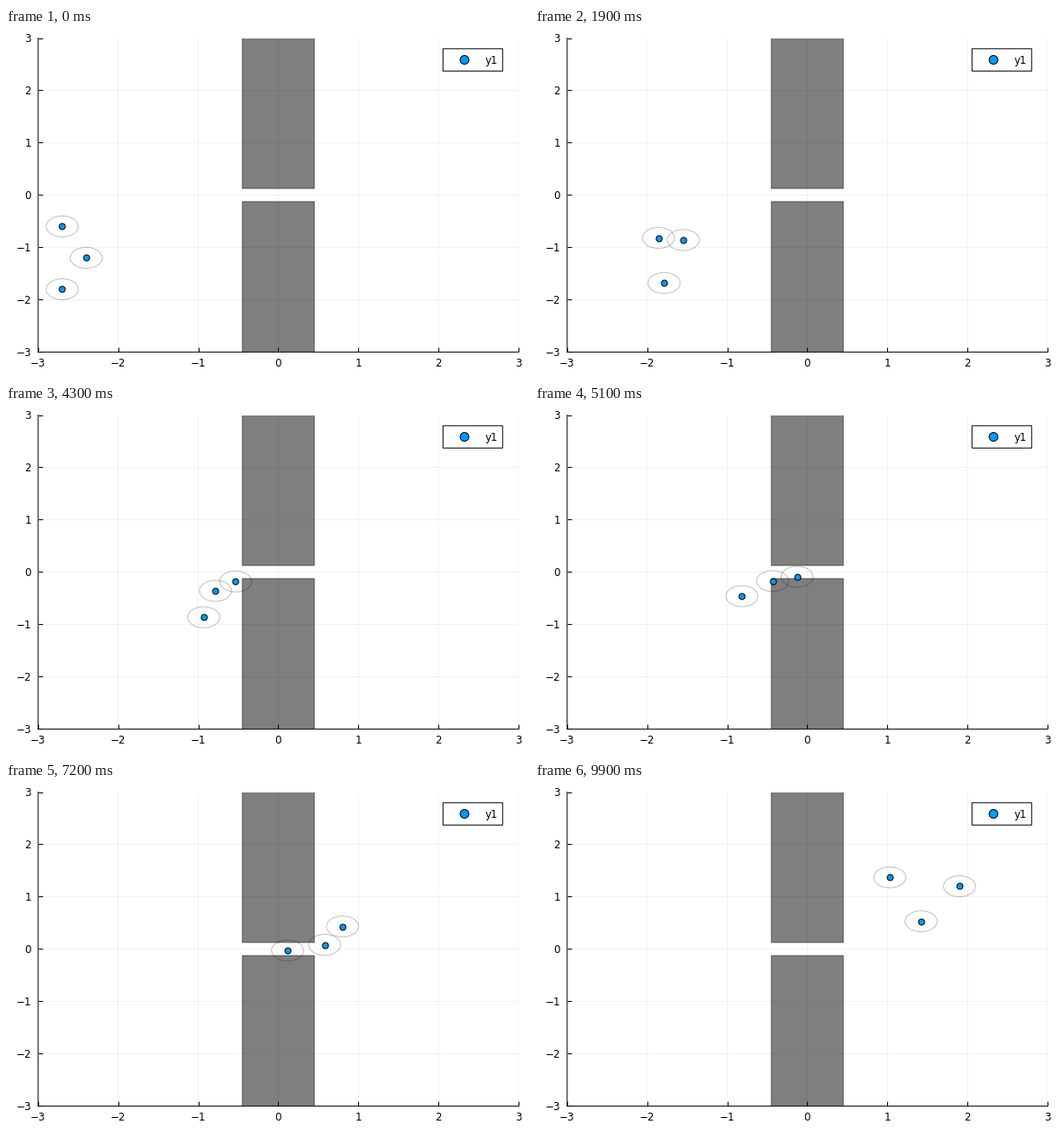
These frames come from a looping animation (600x400 px, 10000 ms). A matplotlib script:

```python
import numpy as np
import matplotlib.pyplot as plt
from matplotlib.animation import FuncAnimation
from matplotlib.patches import Ellipse, Rectangle
from matplotlib.transforms import Affine2D

W, H, DPI = 600, 400, 100
FRAMES = 100
PX = 72 / DPI
BLUE = "#009AFA"
RADIUS = 0.2
PACE = 1.04  # the agents pick up speed very slightly

plt.rcParams.update({"font.family": "DejaVu Sans", "font.size": 8.6,
                     "path.snap": False})

# Turning points of the three routes through the gap.
ROUTES = [
    [(-2.7, -0.6), (-1.89, -0.82), (-0.83, -0.38), (-0.03, 0),
     (0.59, 0.09), (0.81, 0.58), (1.03, 1.37)],
    [(-2.4, -1.2), (-1.57, -0.87), (-0.51, -0.17), (0.35, 0.03),
     (0.8, 0.43), (1.12, 0.93), (1.9, 1.2)],
    [(-2.7, -1.8), (-1.76, -1.67), (-1.14, -1.28), (-0.91, -0.81),
     (-0.72, -0.27), (-0.35, -0.06), (0.4, -0.01), (1.42, 0.53)],
]


def lengths(p):
    """Distance travelled along a polyline, at each of its points."""
    return np.append(0, np.cumsum(np.hypot(*np.diff(p, axis=0).T)))


def curve(points, n=2000):
    """Smooth cubic curve through the points."""
    p = np.array(points, float)
    t = lengths(p)
    m = np.gradient(p, t, axis=0, edge_order=2)
    s = np.linspace(0, t[-1], n)
    i = np.clip(np.searchsorted(t, s, side="right") - 1, 0, len(t) - 2)
    h = (t[i + 1] - t[i])[:, None]
    u = (s - t[i])[:, None] / h
    return ((1 + 2 * u) * (1 - u) ** 2 * p[i] + u * (1 - u) ** 2 * h * m[i]
            + u ** 2 * (3 - 2 * u) * p[i + 1] + u ** 2 * (u - 1) * h * m[i + 1])


def travel(points):
    """Positions per step when the route is walked at a near-steady speed."""
    c = curve(points)
    d = lengths(c)
    goal = d[-1] * np.linspace(0, 1, FRAMES) ** PACE
    return np.column_stack([np.interp(goal, d, axis) for axis in c.T])


paths = [travel(r) for r in ROUTES]

fig = plt.figure(figsize=(W / DPI, H / DPI), dpi=DPI, facecolor="white")
left, right, top, bottom = 36.9, 588, 11.5, 371.4
ax = fig.add_axes([left / W, 1 - bottom / H, (right - left) / W, (bottom - top) / H])
ax.set(xlim=(-3, 3), ylim=(-3, 3), xticks=range(-3, 4), yticks=range(-3, 4))
ax.set_axisbelow(True)
ax.grid(color="black", alpha=0.1, lw=0.5 * PX)
ax.spines[["top", "right"]].set_visible(False)
ax.spines[["left", "bottom"]].set_linewidth(PX)
ax.tick_params(direction="in", length=5 * PX, width=PX)
ax.tick_params(axis="x", pad=6.4 * PX)
ax.tick_params(axis="y", pad=8 * PX)

shade = (0, 0, 0, 0.5)
for y in (0.125, -5.125):
    ax.add_patch(Rectangle((-0.45, y), 0.9, 5, fc=shade, ec=shade, lw=PX))

rings = [ax.add_patch(Ellipse(p[0], 2 * RADIUS, 2 * RADIUS, fill=False,
                              ec=(0, 0, 0, 0.25), lw=PX, zorder=2))
         for p in paths]
dot = dict(fc=BLUE, ec="black", lw=PX)
dots = ax.scatter(*np.transpose([p[0] for p in paths]), s=(7 * PX) ** 2,
                  zorder=3, **dot)

# Legend, in pixels from the top left corner.
pixels = Affine2D().scale(1 / W, -1 / H).translate(0, 1) + fig.transFigure
fig.add_artist(Rectangle((501.3, 23.8), 68.5, 25.5, fc="white", ec="black",
                         lw=PX, transform=pixels, zorder=4))
fig.add_artist(Ellipse((526, 36.5), 10, 10, transform=pixels, zorder=5, **dot))
fig.text(549.6, 41, "y1", transform=pixels, zorder=5)


def update(step):
    spots = [p[step] for p in paths]
    dots.set_offsets(spots)
    for ring, spot in zip(rings, spots):
        ring.set_center(spot)
    return [dots, *rings]


anim = FuncAnimation(fig, update, frames=FRAMES, interval=100,
                     repeat=True, repeat_delay=0)
plt.show()
```
